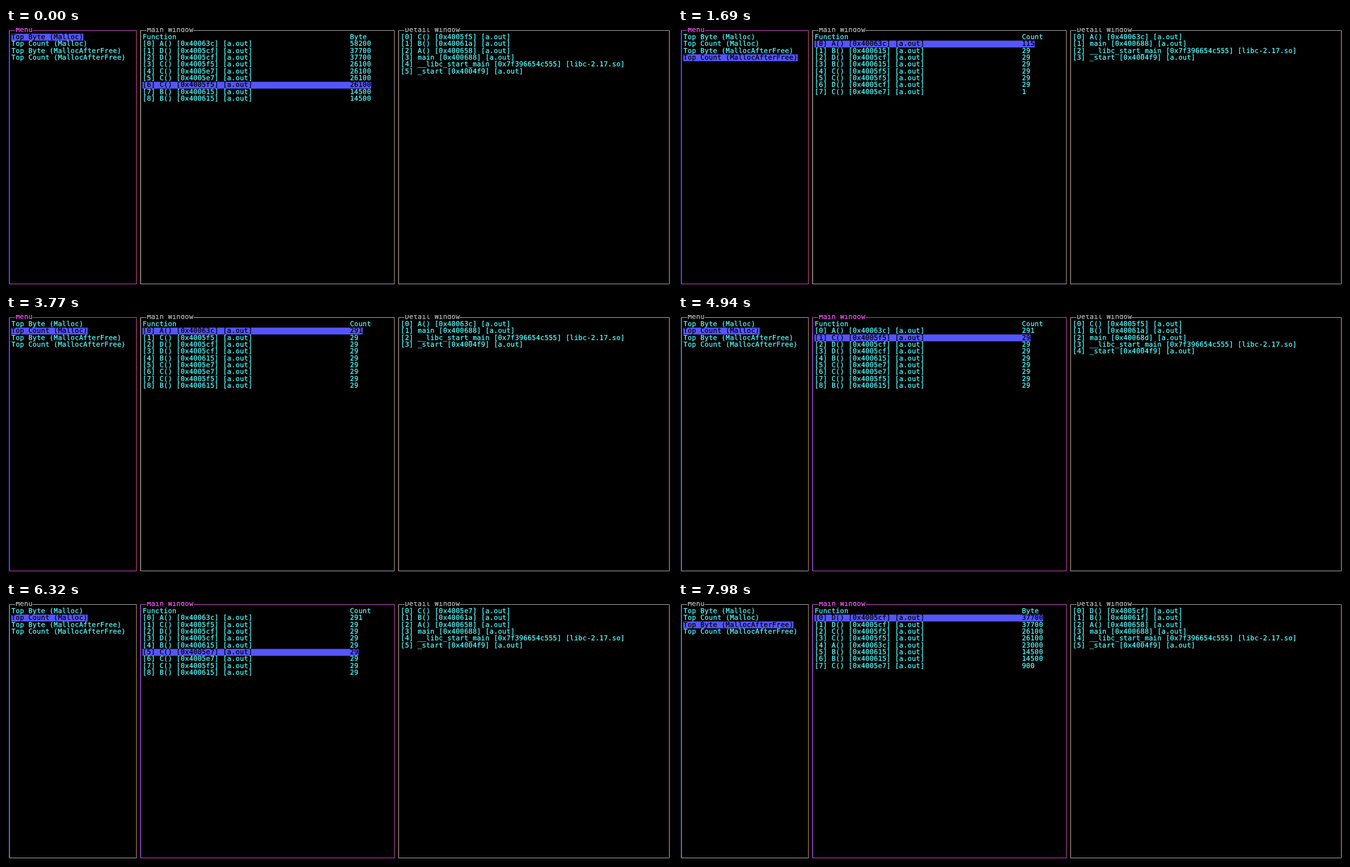
An HTML page that plays this animation: 1198 px wide and 467 px high, repeating every 8 s.

```html
<!DOCTYPE html>
<html lang="en">
<head>
<meta charset="utf-8">
<title>Malloc viewer</title>
<style>
  html, body { margin: 0; width: 100%; height: 100%; overflow: hidden; background: #000; }
  svg { display: block; width: 1198px; height: 467px; }
  text {
    font-family: "DejaVu Sans Mono", monospace;
    font-size: 12.2px;
    letter-spacing: 0.267px;
    white-space: pre;
    text-rendering: geometricPrecision;
    color: #5ff;
    fill: currentColor;
    stroke: currentColor;
    stroke-width: 0.25px;
  }
  text.sel { color: #000; }
</style>
</head>
<body>
<svg id="screen" viewBox="0 0 1198 467"></svg>
<script>
const LOOP = 8000;
const COL = 7.612, ROW = 12.37;
const GRAY = '#b4b4b4', PINK = '#d848d8';

const menu = [
  'Top Byte (Malloc)', 'Top Count (Malloc)',
  'Top Byte (MallocAfterFree)', 'Top Count (MallocAfterFree)'
];

// Each entry: function letter, address tail, value.
const tables = [
  'A63c:58200 D5cf:37700 D5cf:37700 C5f5:26100 C5e7:26100 C5e7:26100 C5f5:26100 B615:14500 B615:14500',
  'A63c:291 C5f5:29 D5cf:29 D5cf:29 B615:29 C5e7:29 C5e7:29 C5f5:29 B615:29',
  'D5cf:37700 D5cf:37700 C5f5:26100 C5f5:26100 A63c:23000 B615:14500 B615:14500 C5e7:900',
  'A63c:115 B615:29 D5cf:29 B615:29 C5f5:29 C5f5:29 D5cf:29 C5e7:1'
].map(list => list.split(' ').map(entry => entry.split(':')));

const VIA_A = ' A658 main688', DIRECT = ' main68d', TOP = 'A63c main688';

// Start time, menu item, table row, focused pane, call stack.
const steps = [
  [0, 0, 6, 0, 'C5f5 B61a' + VIA_A],
  [670, 1, 0, 0, TOP],
  [1230, 2, 0, 0, 'D5cf B61f' + VIA_A],
  [1690, 3, 0, 0, TOP],
  [2330, 2, 0, 0, 'D5cf B61f' + VIA_A],
  [2790, 1, 0, 0, TOP],
  [3270, 0, 0, 0, TOP],
  [3770, 1, 0, 0, TOP],
  [4330, 1, 0, 1, TOP],
  [4940, 1, 1, 1, 'C5f5 B61a' + DIRECT],
  [5300, 1, 2, 1, 'D5cf B61f' + DIRECT],
  [5630, 1, 3, 1, 'D5cf B61f' + VIA_A],
  [5960, 1, 4, 1, 'B615' + VIA_A],
  [6320, 1, 5, 1, 'C5e7 B61a' + VIA_A],
  [6610, 1, 6, 1, 'C5e7 B61a' + DIRECT],
  [6980, 1, 6, 0, 'C5e7 B61a' + DIRECT],
  [7340, 2, 0, 0, 'D5cf B61f' + VIA_A],
  [7980, 2, 0, 1, 'D5cf B61f' + VIA_A]
];

// Vertical edges are [x, colour] strips, tinted like subpixel-rendered lines.
const panes = [
  { title: 'Menu', col: 0, x: 6, end: 235,
    edges: [[5, '#40609c'], [6, '#b88850'], [234, '#c09460']],
    lit: [[5, '#5038e8'], [6, '#c83888'], [234, '#e04890']] },
  { title: 'Main Window', col: 31, x: 241, end: 699,
    edges: [[241, '#586890'], [242, '#b09058']],
    lit: [[241, '#5040d8'], [242, '#c03880']] },
  { title: 'Detail Window', col: 92, x: 706, end: 1194,
    edges: [[705, '#38486c'], [706, '#b08850'], [1192, '#3c3028'], [1193, '#5ca4ec']] }
];
panes[1].edges.push([698, '#b0a898']);
panes[1].lit.push([698, '#d048c0']);

const colX = col => 2.2 + col * COL;
const rowY = row => 10.35 + (row - 1) * ROW;

const rect = (x, y, w, h, fill) =>
  `<rect x="${x}" y="${y}" width="${w}" height="${h}" fill="${fill}"/>`;

const text = (col, row, str, attr = '') =>
  `<text x="${colX(col)}" y="${rowY(row) + 9.5}" ${attr}>${str}</text>`;

const band = (col, row, chars) =>
  rect(colX(col) - 0.4, rowY(row), chars * COL + 0.4, ROW, '#55f');

function frame(pane, lit) {
  const { title, col, x, end } = pane;
  const color = lit ? PINK : GRAY;
  return rect(x, 4, end - x, 1, color) + rect(x, 461, end - x, 1, color) +
    (lit ? pane.lit : pane.edges).map(([ex, fill]) => rect(ex, 4, 1, 458, fill)).join('') +
    rect(colX(col + 2) - 1, 0, title.length * COL + 1, 9, '#000') +
    text(col + 2, 0, title, `style="color:${lit ? '#f5f' : '#bbb'}"`);
}

function call(code, i) {
  const [, name, addr] = code.match(/^(main|[A-D])(.+)$/);
  return `[${i}] ${name}${name === 'main' ? '' : '()'} [0x400${addr}] [a.out]`;
}

function menuText(active) {
  return menu.map((item, i) => i === active
    ? band(1, i + 1, item.length) + text(1, i + 1, item, 'class="sel"')
    : text(1, i + 1, item)).join('');
}

function tableText(table, active) {
  const head = text(32, 1, 'Function') + text(81, 1, table % 2 ? 'Count' : 'Byte');
  return head + tables[table].map(([code, value], i) => {
    const on = i === active, attr = on ? 'class="sel"' : '';
    return (on ? band(32, i + 2, 49 + value.length) : '') +
      text(32, i + 2, call(code, i), attr) + text(81, i + 2, value, attr);
  }).join('');
}

function stackText(stack) {
  const lines = stack.split(' ').map(call);
  lines.push(`[${lines.length}] __libc_start_main [0x7f396654c555] [libc-2.17.so]`);
  lines.push(`[${lines.length}] _start [0x4004f9] [a.out]`);
  return lines.map((line, i) => text(93, i + 1, line)).join('');
}

const screen = document.getElementById('screen');
let shown;

function draw() {
  const t = performance.now() % LOOP;
  const step = steps.findLast(s => s[0] <= t);
  if (step !== shown) {
    const [, item, row, focus, stack] = shown = step;
    screen.innerHTML = rect(0, 0, 1198, 467, '#000') +
      panes.map((pane, i) => frame(pane, i === focus)).join('') +
      menuText(item) + tableText(item, row) + stackText(stack);
  }
  requestAnimationFrame(draw);
}
draw();
</script>
</body>
</html>
```
